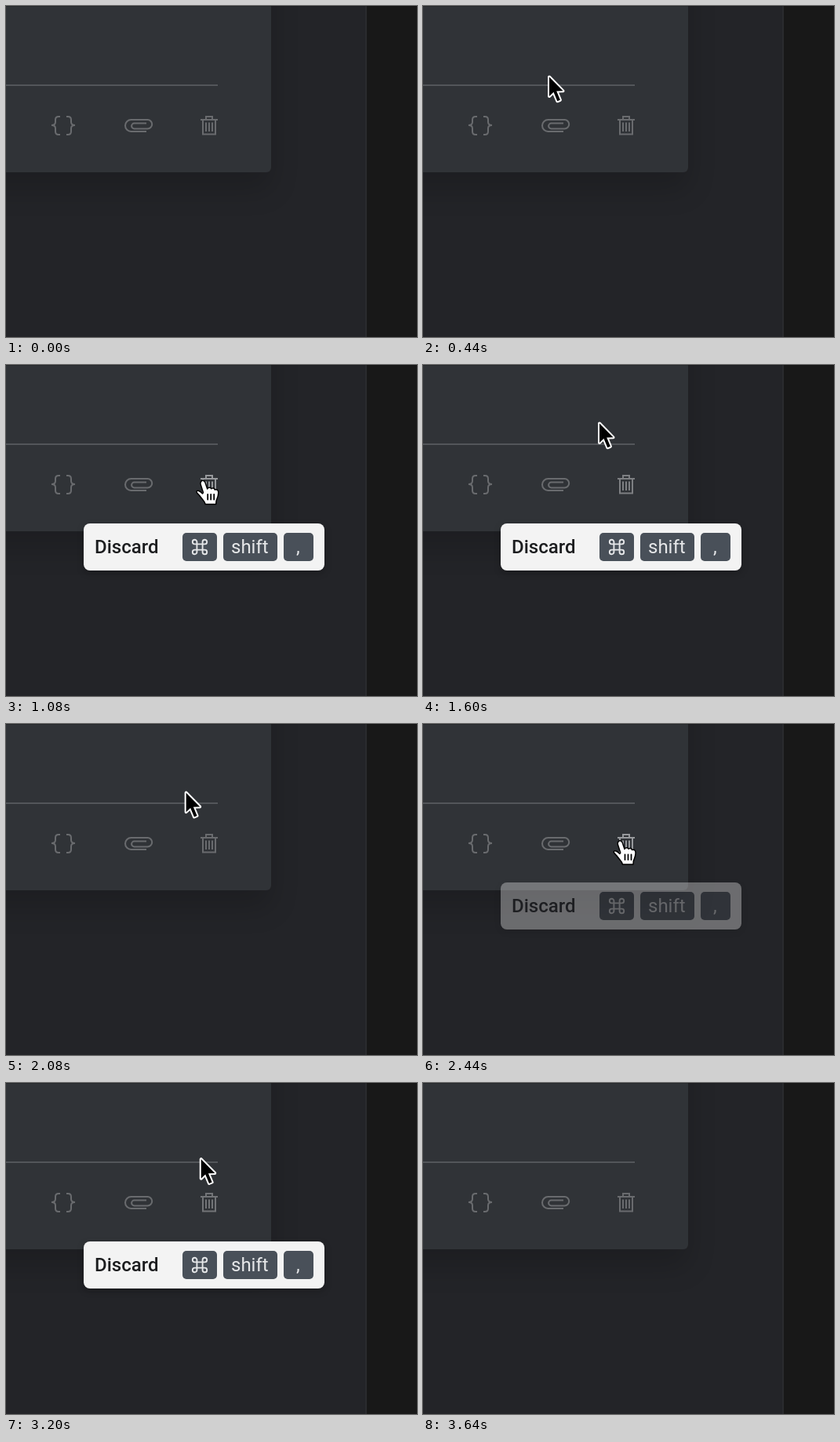
An HTML page for the animation above (3680 ms loop, 524 by 422 pixels).

```html
<!DOCTYPE html>
<html lang="en">
<head>
<meta charset="utf-8">
<title>Discard tooltip</title>
<style>
html, body { margin: 0; width: 100%; height: 100%; overflow: hidden; background: #232428; }
svg { display: block; width: 524px; height: 422px; }
text { font: 500 24px Roboto, Arial, sans-serif; }
.icon { fill: none; stroke: #696b6e; stroke-width: 2; }
.key { fill: #495059; }
.keytext { fill: #e6e7e9; font-weight: 400; }
</style>
</head>
<body>
<svg viewBox="0 0 524 422">
  <defs>
    <filter id="soft" x="-20%" y="-20%" width="140%" height="140%"><feGaussianBlur stdDeviation="18"/></filter>
    <filter id="near" x="-10%" y="-40%" width="120%" height="180%"><feGaussianBlur stdDeviation="5"/></filter>
  </defs>
  <rect width="524" height="422" fill="#232428"/>
  <rect x="-120" y="-120" width="458" height="354" rx="8" fill="#000" opacity=".17" filter="url(#soft)"/>
  <rect x="-20" y="-20" width="358" height="232" rx="6" fill="#303337"/>
  <rect x="458" width="2" height="422" fill="#2a2b2e"/>
  <rect x="460" width="64" height="422" fill="#181818"/>
  <rect width="524" height="1" opacity=".2"/>
  <rect y="100" width="270" height="2" fill="#53565a"/>

  <g class="icon">
    <path d="M69 141h-2q-4 0-4 4v3q0 4-5 4q5 0 5 4v4q0 4 4 4h2M77 141h2q4 0 4 4v3q0 4 5 4q-5 0-5 4v4q0 4-4 4h-2"/>
    <path d="M179 160H159.500a7.500 7.500 0 0 1 0-15H180.500a5.700 5.700 0 0 1 0 11.400H163.500a3.400 3.400 0 0 1 0-6.800H179"/>
    <path id="trash" d="M248 145h22M255 145v-4h8v4M251 145v18.500h16V145M255 148.500v11.500M259 148.500v11.500M263 148.500v11.500"/>
  </g>

  <g id="tip">
    <rect x="99" y="205" width="307" height="60" rx="8" opacity=".25" filter="url(#near)"/>
    <rect x="99" y="202" width="307" height="60" rx="8" fill="#f3f3f3"/>
    <text x="113" y="240" fill="#1c1d1f">Discard</text>
    <rect class="key" x="225" y="214" width="44" height="36" rx="5"/>
    <rect class="key" x="277" y="214" width="69" height="36" rx="5"/>
    <rect class="key" x="354" y="214" width="38" height="36" rx="5"/>
    <path fill="none" stroke="#e6e7e9" stroke-width="1.900" d="M243.400 228.400v-2.800a2.800 2.800 0 1 0-2.800 2.800h12.800a2.800 2.800 0 1 0-2.800-2.800v12.800a2.800 2.800 0 1 0 2.800-2.800h-12.800a2.800 2.800 0 1 0 2.800 2.800z"/>
    <text class="keytext" x="287" y="240">shift</text>
    <text class="keytext" x="370" y="240">,</text>
  </g>

  <g id="cursor">
    <path id="arrow" transform="translate(-1 -1)" paint-order="stroke" stroke="#fff" stroke-width="4" stroke-linejoin="round"
      d="M2 3.500V28L7.500 22.800 12.300 34.300 15.900 32.800 11.200 21.600 19.500 21.300Z"/>
    <g id="hand" transform="translate(-10 -2)" stroke="#000" stroke-linejoin="round" stroke-linecap="round">
      <path fill="#fff" stroke-width="1.500" d="M7 3C8.500 1 11.500 1.800 12.300 4.500L15 12.500C16 9.800 19.500 10.300 20 12.300C21.500 10.800 24 11.500 24.500 13.500C27.500 12.500 29.300 14.500 29 18C28.800 23 27 25 26.300 28L26 32H12.500C11.500 28 8 25.500 5 21C3.500 19 .8 17.500 1.200 15.800C2 13.800 5.500 14.800 8.800 18.500L9.700 17L6.500 7C6 5.500 6.300 4 7 3Z"/>
      <path stroke-width="1.800" d="M15.500 19.500v6.500M19.500 19.500v6.500M23.500 19.500v6.500"/>
    </g>
  </g>
</svg>
<script>
const LOOP = 3680, STEP = 40;
const $ = id => document.getElementById(id);
const tip = $('tip'), trash = $('trash'), cursor = $('cursor'), arrow = $('arrow'), hand = $('hand');

// Pointer path: time, x, y of the hotspot
const path = [
  [160, 5, -15], [440, 160, 88], [560, 212, 134], [680, 234, 152], [760, 241, 149],
  [1000, 251, 146], [1160, 252, 149], [1440, 252, 149], [1600, 224, 72], [1700, 222, 67],
  [1940, 222, 67], [2400, 252, 149], [2730, 252, 149], [2760, 251, 148], [2930, 251, 148],
  [3300, 247, 83], [3530, 247, 83], [3600, 249, 33], [3640, 251, -40]
];

const clamp = v => Math.max(0, Math.min(1, v));
const ramp = (t, from, length) => clamp((t - from) / length);
const easeOut = u => 1 - Math.pow(1 - u, 1.5);

// Tangent at a point, flat where the pointer rests or turns
function slope(i, axis) {
  const a = path[i - 1], b = path[i], c = path[i + 1];
  if (!a || !c) {
    const [p, q] = a ? [a, b] : [b, c];
    return (q[axis] - p[axis]) / (q[0] - p[0]);
  }
  const m = (b[axis] - a[axis]) / (b[0] - a[0]);
  const n = (c[axis] - b[axis]) / (c[0] - b[0]);
  return m * n <= 0 ? 0 : 2 * m * n / (m + n);
}

function pointAt(t, axis) {
  let i = 0;
  while (i < path.length - 2 && t >= path[i + 1][0]) i++;
  const a = path[i], b = path[i + 1], span = b[0] - a[0], u = clamp((t - a[0]) / span);
  const v = u * u, w = v * u;
  return (2 * w - 3 * v + 1) * a[axis] + (w - 2 * v + u) * span * slope(i, axis)
    + (3 * v - 2 * w) * b[axis] + (w - v) * span * slope(i + 1, axis);
}

function draw(t) {
  const x = pointAt(t, 1), y = pointAt(t, 2), over = x > 220 && y > 126;
  cursor.style.display = t >= 160 && t < 3640 ? '' : 'none';
  cursor.setAttribute('transform', `translate(${x.toFixed(2)} ${y.toFixed(2)})`);
  arrow.style.display = over ? 'none' : '';
  hand.style.display = over ? '' : 'none';

  const show = easeOut(ramp(t, 675, 220)) - ramp(t, 1610, 110)
    + easeOut(ramp(t, 2385, 220)) - ramp(t, 3200, 110);
  tip.setAttribute('opacity', clamp(show).toFixed(3));

  const hover = clamp(ramp(t, 600, 160) - ramp(t, 1510, 160) + ramp(t, 2260, 160) - ramp(t, 3070, 160));
  const shade = Math.round(105 + 46 * hover);
  trash.style.stroke = `rgb(${shade},${shade + 2},${shade + 5})`;
}

const start = performance.now();
function tick() {
  const t = (performance.now() - start) % LOOP;
  draw(Math.floor(t / STEP) * STEP);
  requestAnimationFrame(tick);
}
tick();
</script>
</body>
</html>
```
